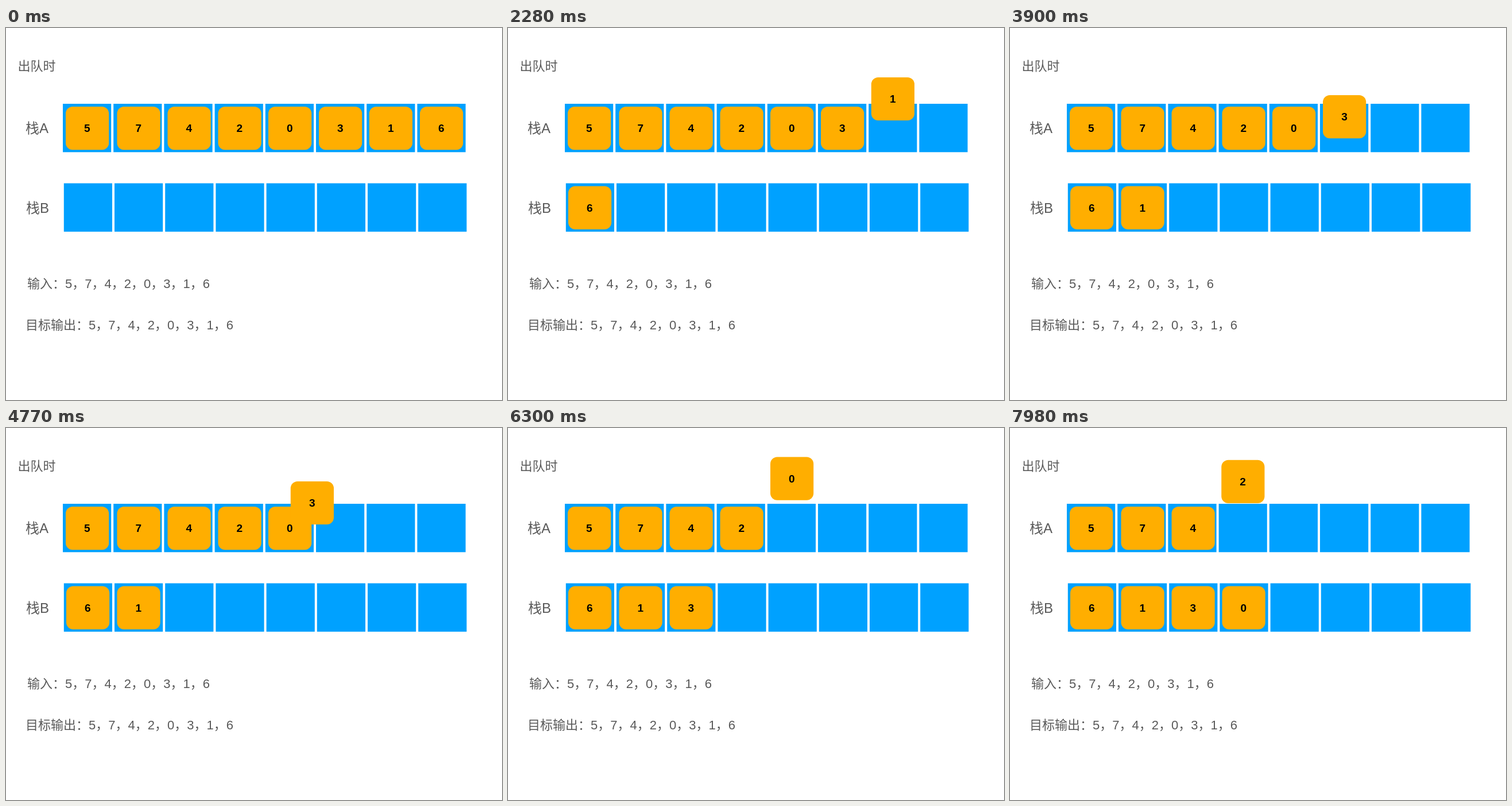
An HTML page for the animation above (8000 ms loop, 864 by 648 pixels).

```html
<!DOCTYPE html>
<html lang="zh-CN">
<head>
<meta charset="utf-8">
<style>
  html, body { margin: 0; width: 100%; height: 100%; overflow: hidden; background: #fff; }
  svg { display: block; width: 864px; height: 648px; }
  text { font-family: "Liberation Sans", "Noto Sans CJK SC", "Noto Sans CJK", sans-serif; font-size: 22px; fill: #5a5a5a; }
  .label { font-size: 24px; }
  .cell { fill: #00a1ff; }
  .tile rect { fill: #ffae00; }
  .tile text { font-size: 19px; font-weight: bold; fill: #000; text-anchor: middle; }
</style>
</head>
<body>
<svg id="stage" viewBox="0 0 864 648">
  <text x="20.5" y="74">出队时</text>
  <text class="label" x="34" y="183.3">栈A</text>
  <text class="label" x="35" y="322.3">栈B</text>
  <text x="37" y="452.8">输入：5，7，4，2，0，3，1，6</text>
  <text x="34" y="525">目标输出：5，7，4，2，0，3，1，6</text>
</svg>
<script>
const LOOP = 8000, STEP = 30, MOVE = 900;
const ROW_A = 137, ROW_B = 275.5;
const stage = document.getElementById('stage');

function add(parent, name, attrs, text = '') {
  const node = document.createElementNS(stage.namespaceURI, name);
  for (const key in attrs) node.setAttribute(key, attrs[key]);
  node.textContent = text;
  return parent.appendChild(node);
}

for (const [left, top] of [[99, 132], [100.8, 270.5]])
  for (let i = 0; i < 8; i++)
    add(stage, 'rect', { class: 'cell', x: left + i * 88.2, y: top, width: 84.2, height: 84.3 });

const startX = [104, 193.5, 281.5, 369.5, 457, 545, 632.8, 721];
const tiles = [5, 7, 4, 2, 0, 3, 1, 6].map((digit, i) => {
  const group = add(stage, 'g', { class: 'tile' });
  add(group, 'rect', { width: 75.2, height: 75.2, rx: 12 });
  add(group, 'text', { x: 37.4, y: 44 }, digit);
  return { group, x: startX[i] };
});

// Moves in popping order: lift to the peak, then slide to the slot in stack B.
const moves = [
  { tile: tiles[7], peak: [721, 46], slot: 105 },
  { tile: tiles[6], peak: [632.8, 45.3], slot: 193.5 },
  { tile: tiles[5], peak: [545.2, 50.8], slot: 281.5 },
  { tile: tiles[4], peak: [457, 50.5], slot: 369.5 },
  { tile: tiles[3], peak: [368.2, 52.8], slot: 457.5 }
];

// cubic-bezier(.42, 0, .58, 1), solved by bisection
function ease(x) {
  if (x <= 0) return 0;
  if (x >= 1) return 1;
  let low = 0, high = 1, u = 0.5;
  for (let i = 0; i < 24; i++) {
    u = (low + high) / 2;
    const v = 1 - u;
    if (3 * v * v * u * 0.42 + 3 * v * u * u * 0.58 + u ** 3 < x) low = u;
    else high = u;
  }
  return u * u * (3 - 2 * u);
}

const mix = (a, b, p) => a + (b - a) * p;
const place = (tile, x, y) => tile.group.setAttribute('transform', `translate(${x} ${y})`);

function draw(time) {
  moves.forEach(({ tile, peak: [px, py], slot }, i) => {
    const phase = (time - i * 2 * MOVE) / MOVE;
    const lift = ease(phase), slide = ease(phase - 1);
    place(tile,
      mix(mix(tile.x, px, lift), slot, slide),
      mix(mix(ROW_A, py, lift), ROW_B, slide));
  });
}

tiles.forEach(tile => place(tile, tile.x, ROW_A));
const start = performance.now();
function tick() {
  const time = (performance.now() - start) % LOOP;
  draw(Math.floor((time + 1) / STEP) * STEP);
  requestAnimationFrame(tick);
}
tick();
</script>
</body>
</html>
```
